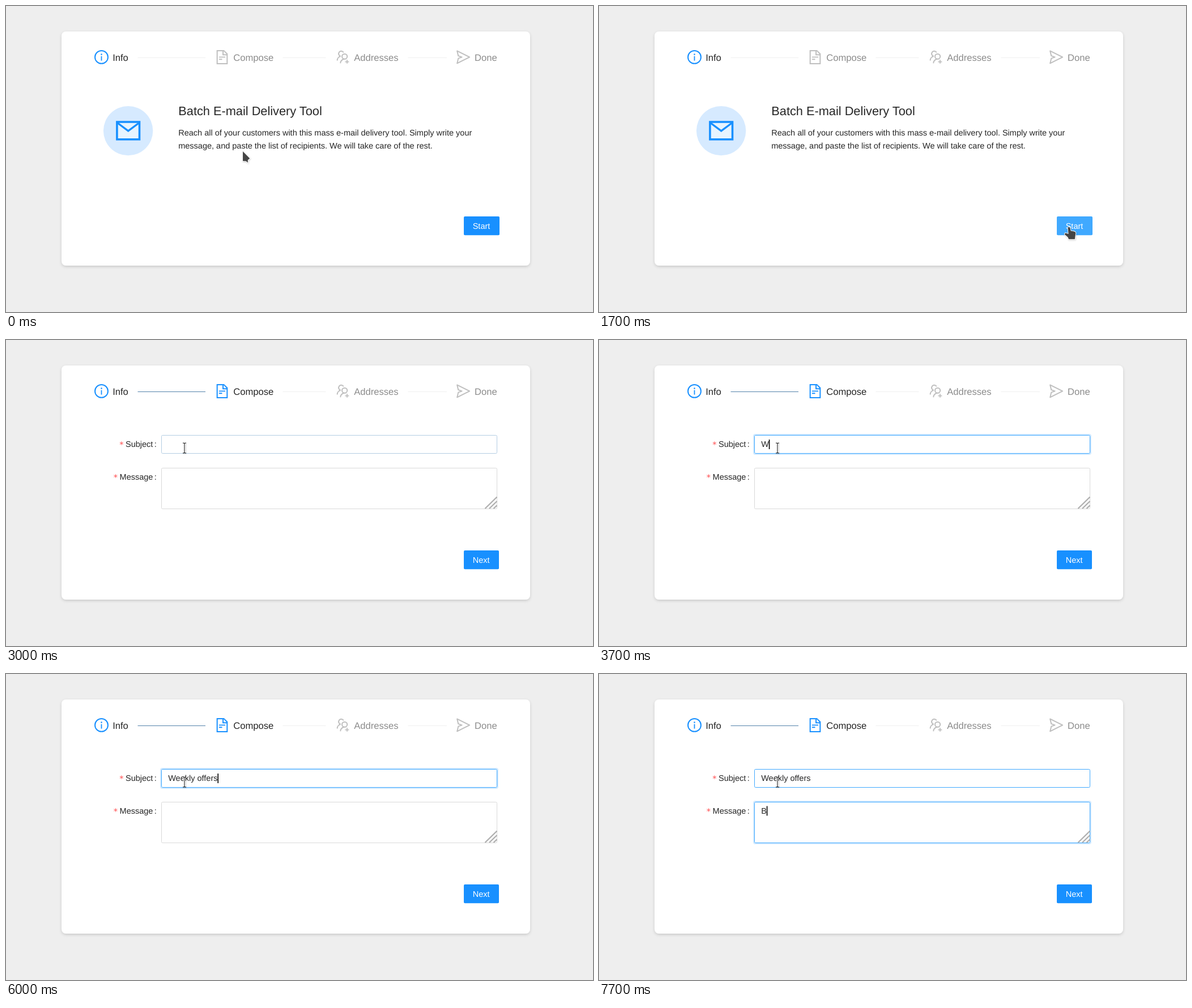
Write an HTML page that moves like this. It is 1036 px wide and 541 px high and loops after 8 s.

```html
<!DOCTYPE html>
<html lang="en">
<head>
<meta charset="utf-8">
<title>Batch E-mail Delivery Tool</title>
<style>
  html, body { margin: 0; width: 100%; height: 100%; overflow: hidden; background: #eee; }
  svg { display: block; width: 1036px; height: 541px; }
  text { font: 14.5px "Liberation Sans", Arial, sans-serif; fill: #262626; white-space: pre; text-rendering: geometricPrecision; }
  .title text { font-size: 16.58px; fill: #8c8c8c; }
  .heading { font-size: 21.76px; }
  .star { font-family: "DejaVu Sans", sans-serif; fill: #ff4d4f; }
  .label { fill: #fff; }
  .icon { fill: none; stroke: #bfbfbf; stroke-width: 72; }
  .thin { stroke-width: 64; }
  .tail { fill: #f0f0f0; }
  .field { fill: #fff; stroke: #d9d9d9; }
  .glow { fill: none; stroke: #1890ff; stroke-opacity: .2; stroke-width: 2; }
</style>
</head>
<body>
<svg viewBox="0 0 1036 541">
  <defs>
    <filter id="lift" x="-5%" y="-5%" width="110%" height="112%">
      <feDropShadow dx="0" dy="2" stdDeviation="2.8" flood-opacity=".16"/>
    </filter>
    <filter id="halo" x="-40%" y="-40%" width="190%" height="190%">
      <feDropShadow dx=".5" dy="1" stdDeviation="1" flood-opacity=".25"/>
    </filter>
  </defs>
  <rect width="1036" height="541" fill="#eee"/>
  <rect x="98" y="45" width="827" height="414" rx="8" fill="#fff" filter="url(#lift)"/>

  <g class="title">
    <text x="188.2" y="97" style="fill:#262626">Info</text>
    <text x="401.2" y="97" id="composeTitle">Compose</text>
    <text x="614.2" y="97">Addresses</text>
    <text x="827" y="97">Done</text>
  </g>
  <rect class="tail" x="232.5" y="91" width="119.5" height="1" id="firstTail"/>
  <rect class="tail" x="488.5" y="91" width="76" height="1"/>
  <rect class="tail" x="709.5" y="91" width="68.5" height="1"/>

  <g class="icon" transform="translate(154.2 76.1) scale(.0279)" style="stroke:#1890ff">
    <circle cx="512" cy="512" r="410"/>
    <path class="thin" d="M512 448V736"/>
    <circle cx="512" cy="336" r="48" fill="#1890ff" stroke="none"/>
  </g>
  <g class="icon" transform="translate(367.2 76.1) scale(.0279)" id="composeIcon">
    <path d="M196 100H617L828 311V924H196ZM568 100V360H828"/>
    <path class="thin" d="M312 514H712M312 650H512"/>
  </g>
  <g class="icon" transform="translate(580.2 76.1) scale(.0279)">
    <circle cx="624" cy="472" r="164"/>
    <path d="M360 897A264 261 0 0 1 624 636M556 222A164 164 0 1 0 375 457M160 728A264 264 0 0 1 372 464"/>
    <path class="thin" d="M656 804H900M780 684V916"/>
  </g>
  <g class="icon" transform="translate(793 76.1) scale(.0279)" stroke-linejoin="round">
    <path d="M114 118L900 513L114 906L190 592L416 512L190 432Z"/>
  </g>

  <g id="intro">
    <circle cx="215.6" cy="220.6" r="43.7" fill="#d6eaff"/>
    <rect x="195.9" y="205" width="39.6" height="30.8" fill="#e6f4ff" stroke="#1890ff" stroke-width="3.6"/>
    <path d="M196.5 206.5L215.7 220.8L235 206.5" fill="none" stroke="#1890ff" stroke-width="3.4"/>
    <text class="heading" x="304.3" y="193">Batch E-mail Delivery Tool</text>
    <text x="304.2" y="229">Reach all of your customers with this mass e-mail delivery tool. Simply write your</text>
    <text x="304.2" y="251.9">message, and paste the list of recipients. We will take care of the rest.</text>
  </g>

  <g id="form">
    <text class="star" x="200.2" y="190.3">*</text>
    <text x="211" y="189">Subject</text>
    <text x="261.8" y="189">:</text>
    <text class="star" x="189.7" y="248.1">*</text>
    <text x="200.6" y="246.8">Message</text>
    <text x="261.8" y="246.8">:</text>
    <rect class="glow" x="273" y="167" width="595" height="35" rx="3" id="subjectGlow"/>
    <rect class="field" x="274.5" y="168.5" width="592" height="32" rx="2" id="subjectBox"/>
    <rect class="glow" x="273" y="225" width="595" height="75" rx="3" id="messageGlow"/>
    <rect class="field" x="274.5" y="226.5" width="592" height="72" rx="2" id="messageBox"/>
    <path d="M845.5 298L866.5 277.5M853 298L866.5 285M860.5 298L866.5 292.3" stroke="#b0b0b0" stroke-width="2.4"/>
    <text x="286.2" y="189" id="subject"></text>
    <text x="286.2" y="246.8" id="message"></text>
    <rect width="1.6" height="17" id="caret"/>
  </g>

  <rect x="808" y="372" height="33.3" rx="2" id="button"/>
  <text class="label" x="823.7" y="393.6" id="buttonLabel"></text>

  <g id="cursor" filter="url(#halo)">
    <path id="arrow" d="M0 0L12.3 12.5L8.8 15.3V20L5.6 17.2L0 17Z" fill="#444" stroke="#fff" stroke-width="1.6" paint-order="stroke"/>
    <path id="hand" d="M-1.5 1.2Q0-1.5 2.3 1L3.8 6.8L8 7.2Q12 7.8 12.4 10.5L11.6 15.5L10.8 21.3H0L-1.5 17.8L-7 13Q-7.6 10.4-5 10.4L-.4 12Z" fill="#444" stroke="#fff" stroke-width="1.8" paint-order="stroke"/>
    <g id="beam" fill="none">
      <path d="M0-9V9" stroke="#fff" stroke-width="3.5"/>
      <path d="M-3-9Q0-9 0-7.5V7.5Q0 9-3 9M3-9Q0-9 0-7.5M0 7.5Q0 9 3 9" stroke="#333" stroke-width="1.2"/>
    </g>
  </g>
</svg>
<script>
const LOOP = 8000, STEP = 100;
const GREY = [217, 217, 217], SKY = [64, 169, 255], BLUE = [24, 144, 255];
const $ = id => document.getElementById(id);

// Pointer stops: time, x, y, shape
const pointer = [
  [0, 418, 257, 'arrow'], [400, 413.5, 236, 'beam'], [500, 432, 172, 'arrow'],
  [600, 472, 129, 'arrow'], [700, 519.5, 180, 'beam'], [1000, 540, 188, 'beam'],
  [1100, 615, 268, 'arrow'], [1200, 715, 335, 'arrow'], [1300, 795, 375, 'arrow'],
  [1400, 825, 388, 'hand'], [1500, 829, 391, 'hand'],
  [2400, 800, 380, 'arrow'], [2500, 783, 373, 'arrow'], [3000, 315, 191, 'beam']
];
const subjectKeys = [3700, 3900, 4200, 4300, 4500, 4900, 5000, 5100, 5400, 5500, 5600, 5800, 6000];

const mix = (a, b, p) => `rgb(${a.map((v, i) => Math.round(v + (b[i] - v) * p))})`;
const show = (id, on) => { $(id).style.display = on ? '' : 'none'; };
const paint = (id, prop, color) => { $(id).style[prop] = color; };

// Piecewise linear value through [time, value] pairs
function track(t, ...keys) {
  const i = keys.findIndex(k => k[0] > t);
  if (i === 0) return keys[0][1];
  if (i < 0) return keys[keys.length - 1][1];
  const [[t0, v0], [t1, v1]] = [keys[i - 1], keys[i]];
  return v0 + (v1 - v0) * (t - t0) / (t1 - t0);
}

function render(t) {
  const composing = t >= 1900;
  show('intro', !composing);
  show('form', composing);

  const progress = track(t, [1800, 0], [1900, .45], [2100, 1]);
  paint('composeTitle', 'fill', mix([140, 140, 140], [38, 38, 38], progress));
  paint('composeIcon', 'stroke', mix([191, 191, 191], BLUE, progress));
  paint('firstTail', 'fill', mix([240, 240, 240], [82, 129, 170], progress));

  const hover = track(t, [1300, 0], [1400, .4], [1500, .8], [1700, 1], [1800, .75],
    [2000, 0], [2100, .1], [2300, .9], [2500, 0]);
  paint('button', 'fill', mix(BLUE, SKY, hover));
  $('button').setAttribute('width', composing ? 62 : 63);
  $('buttonLabel').textContent = composing ? 'Next' : 'Start';

  const messageFocus = track(t, [6200, 0], [6300, .5], [6400, 1]);
  paint('subjectBox', 'stroke', mix(GREY, SKY, track(t, [2900, 0], [3000, .25], [3200, 1])));
  paint('messageBox', 'stroke', mix(GREY, SKY, messageFocus));
  $('subjectGlow').style.opacity = track(t, [3100, 0], [3200, .4], [3400, 1]) - messageFocus;
  $('messageGlow').style.opacity = messageFocus;

  $('subject').textContent = 'Weekly offers'.slice(0, subjectKeys.filter(k => k <= t).length);
  $('message').textContent = t >= 7700 ? 'B' : '';
  const inMessage = t >= 6300;
  const typed = $(inMessage ? 'message' : 'subject');
  show('caret', t >= 3200 && !(t >= 7400 && t < 7700));
  const width = typed.textContent && composing ? typed.getComputedTextLength() : 0;
  $('caret').setAttribute('x', 286.1 + width);
  $('caret').setAttribute('y', inMessage ? 233.5 : 176);

  const [, x, y, shape] = pointer.filter(p => p[0] <= t).pop();
  $('cursor').setAttribute('transform', `translate(${x} ${y})`);
  for (const id of ['arrow', 'hand', 'beam']) show(id, id === shape);
}

const start = performance.now();
function tick() {
  const elapsed = (performance.now() - start) % LOOP;
  render(Math.floor(elapsed / STEP) * STEP);
  requestAnimationFrame(tick);
}
tick();
</script>
</body>
</html>
```
